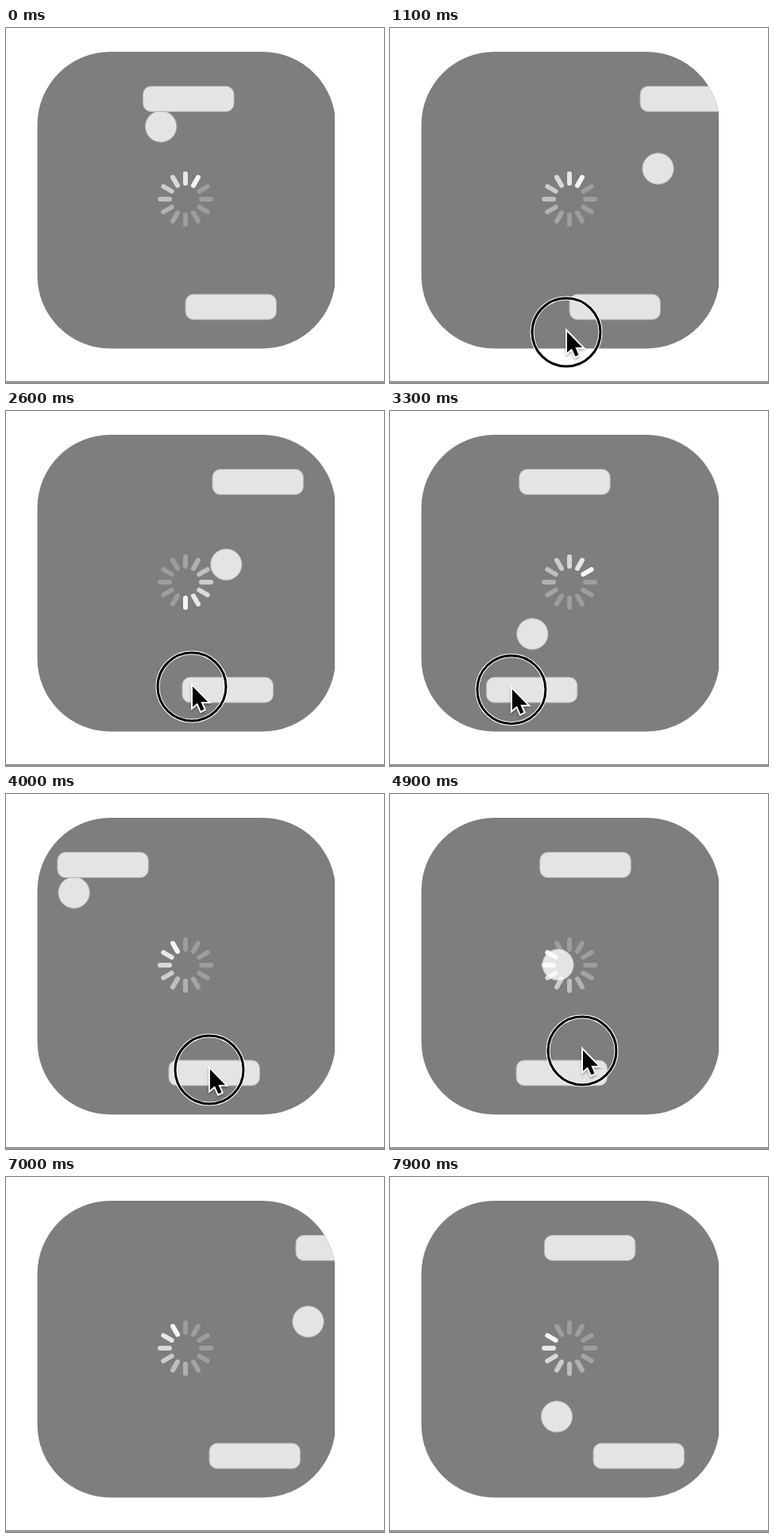
Write an HTML page with a canvas that moves like this. It is 476 px wide and 448 px high and loops after 8000 ms.

```html
<!DOCTYPE html>
<html lang="en">
<head>
<meta charset="utf-8">
<title>Paddle game</title>
<style>
  html, body { margin: 0; width: 100%; height: 100%; overflow: hidden; background: #fff; }
  canvas { display: block; }
</style>
</head>
<body>
<canvas width="476" height="448"></canvas>
<script>
const LOOP = 8000;
const GREY = '#7e7e7e';
const TOP = 124, BOTTOM = 316;          // ball height when it touches a bar
const MISS = 5183;                      // start of the faster shot that goes wide
const GRAB = 1100, RELEASE = 5800;
const ctx = document.querySelector('canvas').getContext('2d');

// Key points: time, then values
const rally = [[0, 0], [GRAB, 1.72], [2600, 3.635], [MISS, 8]];   // court lengths travelled
const ticks = [[0, 0.5], [2600, 29.4], [7900, 93.2]];
const grip = [[GRAB, -4], [2600, 12], [4000, 51], [4900, 83], [RELEASE, 64]];
const hand = [
  [600, 118, 450], [GRAB, 222, 384], [1800, 158, 363], [2100, 230, 350],
  [2600, 234, 348], [2850, 312, 348], [3400, 138, 352], [4000, 256, 348],
  [4500, 185, 328], [4900, 242, 324], [RELEASE, 320, 354], [6000, 320, 354], [6300, 52, 368]
];

const linear = k => k;
const smooth = k => k * k * (3 - 2 * k);
const clamp = (v, lo, hi) => Math.min(hi, Math.max(lo, v));

// Interpolates between key points; linear tracks continue past their ends
function sample(track, t, ease = linear) {
  let i = 1;
  while (i < track.length - 1 && track[i][0] <= t) i++;
  const [a, b] = [track[i - 1], track[i]];
  const k = ease((t - a[0]) / (b[0] - a[0]));
  return a.slice(1).map((v, j) => v + (b[j + 1] - v) * k);
}

// Reflects a straight path between two walls
function bounce(v, lo, hi) {
  const d = hi - lo;
  const m = ((v - lo) % (2 * d) + 2 * d) % (2 * d);
  return lo + d - Math.abs(m - d);
}

function ballAt(t) {
  if (t < MISS) {
    const [p] = sample(rally, t);
    return [bounce(195 + 82.8 * p, 83.5, 386.7), bounce(TOP + (BOTTOM - TOP) * p, TOP, BOTTOM)];
  }
  const dt = t - MISS;
  return [bounce(251 + 0.1895 * dt, 40, 488), bounce(TOP + 0.2632 * dt, TOP, 392.5)];
}

function paddleAt(t) {
  const held = clamp(t, GRAB, RELEASE);
  return sample(hand, held, smooth)[0] - sample(grip, held)[0];
}

function paintPiece() {
  ctx.fillStyle = '#e4e4e4';
  ctx.strokeStyle = '#b4b4b4';
  ctx.lineWidth = 1;
  ctx.fill();
  ctx.stroke();
}

function drawBar(x, y) {
  ctx.beginPath();
  ctx.roundRect(x, y, 114.5, 32, 10);
  paintPiece();
}

function drawBall(x, y) {
  ctx.beginPath();
  ctx.arc(x, y, 19.7, 0, Math.PI * 2);
  paintPiece();
}

function drawSpinner(step) {
  const head = Math.floor(step) + 1;
  ctx.strokeStyle = '#fff';
  ctx.lineWidth = 6;
  ctx.lineCap = 'round';
  for (let age = 0; age < 12; age++) {
    ctx.save();
    ctx.translate(226, 216);
    ctx.rotate((head - age) * Math.PI / 6);
    ctx.globalAlpha = Math.max(0.24, 0.92 - age * 0.105);
    ctx.beginPath();
    ctx.moveTo(0, -20);
    ctx.lineTo(0, -32);
    ctx.stroke();
    ctx.restore();
  }
}

function drawCursor(x, y, pressed) {
  ctx.save();
  ctx.translate(x, y);
  if (pressed) {
    ctx.beginPath();
    ctx.arc(0, 0, 43, 0, Math.PI * 2);
    ctx.strokeStyle = '#fff';
    ctx.lineWidth = 5;
    ctx.stroke();
    ctx.strokeStyle = '#000';
    ctx.lineWidth = 3;
    ctx.stroke();
  }
  const arrow = new Path2D('M1-.5V25.5L7 20.5L11.5 30.5L15.5 28.5L11.4 19H20Z');
  ctx.shadowColor = 'rgba(0,0,0,.3)';
  ctx.shadowBlur = 3;
  ctx.shadowOffsetY = 2;
  ctx.strokeStyle = '#fff';
  ctx.lineWidth = 4;
  ctx.stroke(arrow);
  ctx.shadowColor = 'transparent';
  ctx.fillStyle = '#000';
  ctx.fill(arrow);
  ctx.restore();
}

function clipField() {
  ctx.beginPath();
  ctx.rect(0, 0, 414, 448);
  ctx.clip();
  ctx.beginPath();
  ctx.roundRect(39.5, 30, 375.5, 374.5, 92);
  ctx.fill();
  ctx.clip();
}

function draw(t) {
  ctx.fillStyle = '#fff';
  ctx.fillRect(0, 0, 476, 448);
  ctx.fillStyle = GREY;
  ctx.fillRect(0, 445.7, 476, 2);

  ctx.save();
  clipField();
  drawBall(...ballAt(t));
  // The upper bar trails the ball slightly
  drawBar(ballAt(t - 22)[0] - 19.7, 73.5);
  drawBar(paddleAt(t), 336);
  drawSpinner(sample(ticks, t)[0]);
  ctx.restore();

  if (t > 600 && t < 6350) {
    drawCursor(...sample(hand, Math.min(t, 6300), smooth), t >= 900 && t < RELEASE);
  }
}

const start = performance.now();
function frame() {
  draw((performance.now() - start) % LOOP);
  requestAnimationFrame(frame);
}
frame();
</script>
</body>
</html>
```
